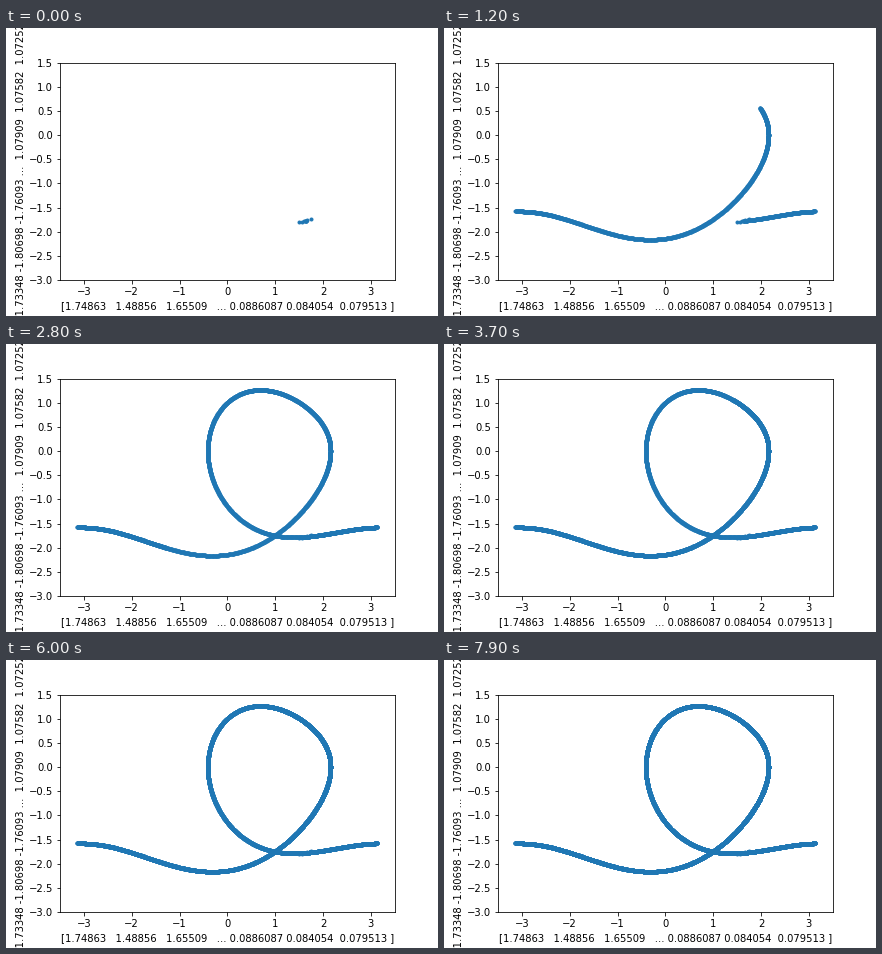
Recreate the animation shown at these times as a matplotlib script. Size 432 by 288 pixels, loop 8000 ms.

```python
import numpy as np
import matplotlib.pyplot as plt
from matplotlib.animation import FuncAnimation

FRAMES, INTERVAL = 80, 100
FIRST, PER_FRAME = 10, 100   # samples at the start, then added per frame
STALL = 14                   # one frame adds nothing

# Damped, driven pendulum: w' = -w/Q - sin(a) + G cos(OMEGA t)
Q, G, OMEGA = 2.0, 1.4, 2 / 3
LAP = 2233                   # steps per drive period
SETTLE = 30                  # periods before the motion repeats


def slope(s, t):
    a, w = s
    return np.array([w, -w / Q - np.sin(a) + G * np.cos(OMEGA * t)])


def steady_lap():
    """One drive period of the settled motion (Runge-Kutta)."""
    period = 2 * np.pi / OMEGA
    s, t = np.array([-0.3, -2.185]), 3.0 / OMEGA
    path = []
    coarse, fine = 300, LAP
    for steps, laps in ((coarse, SETTLE), (fine, 1)):
        h = period / steps
        for _ in range(steps * laps):
            k1 = slope(s, t)
            k2 = slope(s + h / 2 * k1, t + h / 2)
            k3 = slope(s + h / 2 * k2, t + h / 2)
            k4 = slope(s + h * k3, t + h)
            s = s + h / 6 * (k1 + 2 * k2 + 2 * k3 + k4)
            t += h
            if steps == fine:
                path.append(s)
    a, w = np.array(path).T
    return (a + np.pi) % (2 * np.pi) - np.pi, w


# Strobing slightly faster than the drive walks backwards along the lap
angle, speed = steady_lap()
start = np.argmin(np.hypot(angle - 1.585, speed + 1.78))
k = np.arange(FIRST + FRAMES * PER_FRAME)
order = (start - k) % LAP

# The first samples bounce around the lap before they settle
bounce = 0.16 * (-0.64) ** k
xs = angle[order] + bounce
ys = speed[order] + 0.28 * bounce

plt.rcParams["text.kerning_factor"] = 6
fig = plt.figure(figsize=(6, 4), dpi=72, facecolor="white")
ax = fig.add_axes([0.125, 0.125, 0.775, 0.755])
ax.set_xlim(-3.5, 3.5)
ax.set_ylim(-3, 1.5)
ax.set_xticks(range(-3, 4))
ax.set_yticks(np.arange(-3, 1.6, 0.5))
ax.set_xlabel("[1.74863   1.48856   1.65509   ... 0.0886087 0.084054  0.079513 ]")
ax.set_ylabel("[-1.73348 -1.80698 -1.76093 ...  1.07909  1.07582  1.07252]")
dots, = ax.plot([], [], ".", color="#1f77b4")


def update(i):
    n = FIRST + PER_FRAME * (i - (i >= STALL))
    dots.set_data(xs[:n], ys[:n])
    return dots,


anim = FuncAnimation(fig, update, frames=FRAMES, interval=INTERVAL,
                     repeat=True, repeat_delay=0)
plt.show()
```
